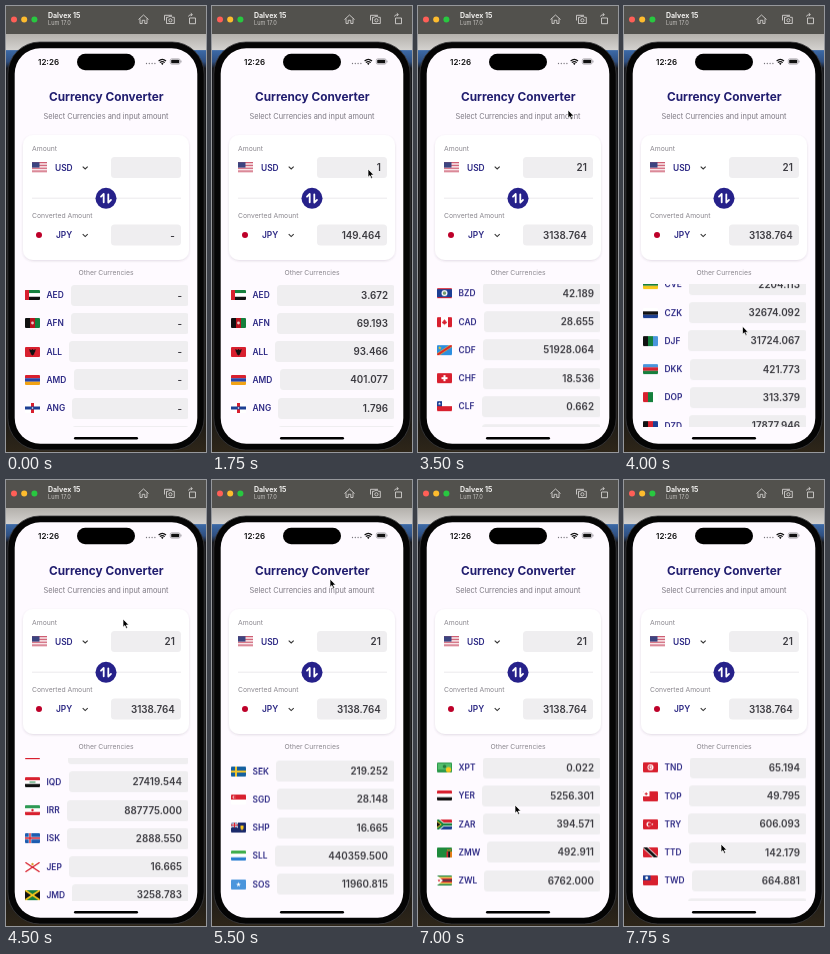
Write an HTML page that moves like this. It is 200x446 px and loops after 8 s.

```html
<!DOCTYPE html>
<html lang="en">
<head>
<meta charset="utf-8">
<title>Currency Converter</title>
<style>
html, body { margin: 0; width: 100%; height: 100%; overflow: hidden; background: #111; }
body { position: relative; font-family: Inter, sans-serif; }
#stage, #pointer { position: absolute; left: 0; top: 0; }
text { font-family: Inter, sans-serif; }
.hint { font-size: 6.8px; fill: #8b888f; }
.code { font-size: 8.4px; font-weight: 600; fill: #2c2884; color: #2c2884; }
.value { font-size: 9.8px; font-weight: 600; fill: #3c3b41; color: #3c3b41; }
#list { position: absolute; left: 18.5px; top: 277.5px; width: 163.5px; height: 143.5px; overflow: hidden; }
#rows { margin-top: -2.5px; will-change: transform; }
.row { display: flex; align-items: center; height: 28.25px; }
.row svg { flex: none; border-radius: 1px; margin-right: 6.5px; }
.row .value { flex: 1; margin-left: 7.2px; padding-right: 6.5px; line-height: 21px; height: 21px;
  text-align: right; background: #efeef0; border-radius: 3.5px; }
</style>
</head>
<body>
<svg id="stage" width="200" height="446" viewBox="0 0 200 446">
  <defs>
    <linearGradient id="desk" x2="0" y2="1">
      <stop offset=".062" stop-color="#b3b0ab"/><stop offset=".098" stop-color="#d3d1ce"/>
      <stop offset=".1" stop-color="#3b69a6"/><stop offset=".125" stop-color="#2f4f80"/>
      <stop offset=".14" stop-color="#17181c"/><stop offset=".92" stop-color="#1c1a17"/>
      <stop offset="1" stop-color="#2e2619"/>
    </linearGradient>
    <filter id="soft" x="-10%" y="-10%" width="120%" height="125%">
      <feDropShadow dx="0" dy="1" stdDeviation="1.3" flood-color="#4a3c5a" flood-opacity=".16"/>
    </filter>
  </defs>
  <rect width="200" height="446" fill="url(#desk)"/>
  <rect width="200" height="28" fill="#52514d"/>
  <circle cx="8" cy="13.5" r="3" fill="#ff5f57"/>
  <circle cx="18.2" cy="13.5" r="3" fill="#febc2e"/>
  <circle cx="28.4" cy="13.5" r="3" fill="#28c840"/>
  <text x="42" y="12.2" font-size="7" font-weight="700" fill="#f3f2f0">Dalvex 15</text>
  <text x="42" y="19.2" font-size="5.6" fill="#c4c2bf">Lum 17.0</text>
  <g fill="none" stroke="#d2d0cd" stroke-width=".9" stroke-linejoin="round">
    <path d="M132.5 13.5L137.5 9L142.5 13.5M134 12.5V17.5H136.2V14.3H138.8V17.5H141V12.5"/>
    <path d="M158.5 14.5V9.3H166M160.5 11.3H162.3L163 10.3H165.5L166.2 11.3H168.3V17.5H160.5Z"/>
    <circle cx="164.4" cy="14.3" r="1.6"/>
    <path d="M183.5 12H189.5V17.7H183.5ZM182.5 10.5Q182.7 8.6 186 8.6M184.8 7.2L186.4 8.6L184.8 10"/>
  </g>

  <rect x="1.8" y="36" width="196.4" height="408" rx="32" fill="#050505" stroke="#3c3c3e" stroke-width=".8"/>
  <rect x="8.7" y="42.3" width="182.6" height="395.4" rx="25.6" fill="#fefaff"/>
  <rect x="71" y="47.8" width="58" height="16.4" rx="8.2"/>
  <text x="32" y="58.8" font-size="8" font-weight="600" fill="#111">12:26</text>
  <path d="M140.5 57.5H149.5" stroke="#77747b" stroke-width="1.3" stroke-linecap="round" stroke-dasharray="0 2.8"/>
  <path d="M152.6 55Q156.3 51.6 160 55M153.9 56.6Q156.3 54.5 158.7 56.6" fill="none" stroke="#111" stroke-width="1.2"/>
  <path d="M155 57.6Q156.3 56.6 157.6 57.6L156.3 59Z"/>
  <rect x="164.3" y="52.8" width="9.8" height="5.4" rx="1.6" fill="none" stroke="#8a878d" stroke-width=".6"/>
  <rect x="165.2" y="53.7" width="8" height="3.6" rx=".9" fill="#111"/>
  <path d="M175 54.6V56.4" stroke="#8a878d" stroke-width=".8"/>

  <text x="100.3" y="95.2" font-size="11.8" font-weight="700" fill="#211d6f" text-anchor="middle">Currency Converter</text>
  <text x="100" y="112.8" font-size="7.4" fill="#7d7983" text-anchor="middle">Select Currencies and input amount</text>

  <rect x="17" y="129" width="166" height="125" rx="10" fill="#fff" filter="url(#soft)"/>
  <text class="hint" x="26" y="145.2">Amount</text>
  <text class="hint" x="26" y="212.4">Converted Amount</text>
  <g id="from" transform="translate(26,156.2)"></g>
  <g id="to" transform="translate(26,224)"></g>
  <text class="code" x="49" y="164.6">USD</text>
  <text class="code" x="50" y="232.2">JPY</text>
  <path d="M76.7 160.6L79.2 163L81.7 160.6M76.7 228.2L79.2 230.6L81.7 228.2" fill="none" stroke="#333" stroke-width="1.1"/>
  <g fill="#efeef0">
    <rect x="105" y="151" width="70" height="21" rx="3.5"/>
    <rect x="105" y="218.5" width="70" height="21" rx="3.5"/>
  </g>
  <text id="amount" class="value" x="168.8" y="165.1" text-anchor="end"></text>
  <text id="result" class="value" x="168.8" y="232.6" text-anchor="end"></text>
  <path d="M26 192.2H175" stroke="#e6e5e9" stroke-width=".8"/>
  <circle cx="100" cy="192.3" r="10.5" fill="#26218a"/>
  <path d="M97.7 196.3V188L95 190.7M102.3 188.3V196.6L105 193.9" fill="none" stroke="#fff" stroke-width="1.8" stroke-linecap="round" stroke-linejoin="round"/>
  <text class="hint" x="100" y="269.4" text-anchor="middle">Other Currencies</text>
  <rect x="68" y="431" width="64" height="2.4" rx="1.2"/>
</svg>
<div id="list"><div id="rows"></div></div>
<svg id="pointer" width="8" height="12" viewBox="-1 -1 8 12">
  <path d="M0 0V8.2L1.9 6.5L3.2 9.4L4.6 8.8L3.3 6H5.8Z" fill="#000" stroke="#fff" stroke-width=".7"/>
</svg>

<script>
const LOOP = 8000, PITCH = 28.25, FIRST_Y = 288.5;
const $ = id => document.getElementById(id);

const codes = (
  'AED AFN ALL AMD ANG AOA ARS AUD AWG AZN BAM BBD BDT BGN BHD BIF BMD BND BOB BRL BSD BTC BTN BWP BYN BZD ' +
  'CAD CDF CHF CLF CLP CNH CNY COP CRC CUC CUP CVE CZK DJF DKK DOP DZD EGP ERN ETB EUR FJD FKP GBP GEL GGP ' +
  'GHS GIP GMD GNF GTQ GYD HKD HNL HRK HTG HUF IDR ILS IMP INR IQD IRR ISK JEP JMD JOD JPY KES KGS KHR KMF ' +
  'KPW KRW KWD KYD KZT LAK LBP LKR LRD LSL LYD MAD MDL MGA MKD MMK MNT MOP MRU MUR MVR MWK MXN MYR MZN NAD ' +
  'NGN NIO NOK NPR NZD OMR PAB PEN PGK PHP PKR PLN PYG QAR RON RSD RUB RWF SAR SBD SCR SDG SEK SGD SHP SLL ' +
  'SOS SRD SSP STD STN SVC SYP SZL THB TJS TMT TND TOP TRY TTD TWD TZS UAH UGX USD UYU UZS VES VND VUV WST ' +
  'XAF XAG XAU XCD XDR XOF XPD XPF XPT YER ZAR ZMW ZWL').split(' ');

// Worth of 21 dollars
const worth = {
  AED: 77.112, AFN: 1453.053, ALL: 1962.786, AMD: 8422.617, ANG: 37.716,
  BZD: 42.189, CAD: 28.655, CDF: 51928.064, CHF: 18.536, CLF: 0.662,
  IQD: 27419.544, IRR: 887775, ISK: 2888.55, JEP: 16.665, JMD: 3258.783, JPY: 3138.764,
  SEK: 219.252, SGD: 28.148, SHP: 16.665, SLL: 440359.5, SOS: 11960.815,
  TND: 65.194, TOP: 49.795, TRY: 606.093, TTD: 142.179, TWD: 664.881, USD: 21,
  XPT: 0.022, YER: 5256.301, ZAR: 394.571, ZMW: 492.911, ZWL: 6762
};

let seed = 7;
const random = () => (seed = seed * 16807 % 2147483647) / 2147483647;
for (const code of codes) worth[code] ??= 21 * 10 ** (random() * 3.5);

// Flags on a 15 by 10 field
const red = '#d8202f', blue = '#1c3f94', green = '#15803d', yellow = '#f9c81c', white = '#fff', black = '#111';
const shape = (d, fill) => `<path d="${d}" fill="${fill}"/>`;
const rect = (x, y, w, h, fill) => shape(`M${x} ${y}h${w}v${h}h${-w}z`, fill);
const field = fill => rect(0, 0, 15, 10, fill);
const rows = (...c) => c.map((f, i) => rect(0, i * 10 / c.length, 15, 10 / c.length, f)).join('');
const cols = (...c) => c.map((f, i) => rect(i * 15 / c.length, 0, 15 / c.length, 10, f)).join('');
const disc = (x, y, r, fill) => `<circle cx="${x}" cy="${y}" r="${r}" fill="${fill}"/>`;
const line = (d, stroke, w) => `<path d="${d}" fill="none" stroke="${stroke}" stroke-width="${w}"/>`;
const moon = (x, y, r, fill, back) => disc(x, y, r, fill) + disc(x + r * .35, y, r * .78, back);
const star = (x, y, r, fill) => shape('M' + Array.from({length: 10}, (_, i) => {
  const a = i * Math.PI / 5, k = i % 2 ? r * .4 : r;
  return `${x + k * Math.sin(a)} ${y - k * Math.cos(a)}`;
}).join('L') + 'z', fill);
const nordic = (back, outer, inner) => field(back) + line('M5 0V10M0 5H15', outer, 2.6) + line('M5 0V10M0 5H15', inner, 1.4);
const saltire = 'M0 0L15 10M15 0L0 10';

const flags = {
  USD: rows(...Array.from({length: 13}, (_, i) => i % 2 ? white : '#c0304a')) + rect(0, 0, 7.5, 5.4, '#3c4480'),
  JPY: field(white) + disc(7, 5, 3, '#bd0029'),
  AED: rows(green, white, black) + rect(0, 0, 4, 10, red),
  AFN: cols(black, '#b8141f', green) + disc(7.5, 5, 1.4, '#e9c9c4'),
  ALL: field(red) + shape('M7.5 2l1.2 1 2-1-.6 3-1 1 .3 1-1.9 1.5-1.9-1.5.3-1-1-1-.6-3 2 1z', black),
  AMD: rows(red, '#2545a8', '#f2a315'),
  ANG: field(white) + rect(6, 0, 3, 10, red) + rect(0, 3.5, 15, 3, blue) + disc(7.5, 5, .8, white),
  BZD: rows(red, ...Array(8).fill(blue), red) + disc(7.5, 5, 3, white) + disc(7.5, 5, 1.8, '#6f9a6b'),
  CAD: field(white) + rect(0, 0, 4, 10, red) + rect(11, 0, 4, 10, red) +
    shape('M7.5 2l.8 1.4.7-.2-.2 1.6 1.4-.4-.3 1.4-1.8 1.2h-1.2L5.1 5.8l-.3-1.4 1.4.4L6 3.2l.7.2zM7.3 6.5h.4V8h-.4z', red),
  CDF: field('#2c8fe0') + line('M0 10L15 0', yellow, 3) + line('M0 10L15 0', red, 2) + star(2.8, 2.8, 2, yellow),
  CHF: field(red) + line('M7.5 2V8M4.5 5H10.5', white, 2),
  CLF: rows(white, red) + rect(0, 0, 5, 5, blue) + star(2.5, 2.5, 1.6, white),
  IQD: rows(red, white, black) + line('M4.5 5H10.5', green, 1.2),
  IRR: rows('#2f9a55', white, red) + disc(7.5, 5, 1.2, red),
  ISK: nordic('#1c5cb0', white, red),
  JEP: field(white) + line(saltire, red, 1.3) + disc(7.5, 2, 1.2, '#d99b2a'),
  JMD: field(green) + shape('M0 0L7 5L0 10zM15 0L8 5L15 10z', black) + line(saltire, yellow, 1.8),
  SEK: field('#15609f') + line('M5 0V10M0 5H15', '#f0c52c', 2),
  SGD: rows(red, white) + moon(3.2, 2.5, 1.6, white, red),
  SHP: field('#1b2a6b') + line('M0 0L7 5M7 0L0 5', white, 1) + line('M3.5 0V5M0 2.5H7', white, 1.8) +
    line('M3.5 0V5M0 2.5H7', red, 1) + shape('M9.5 3h3v3l-1.5 1.8L9.5 6z', yellow),
  SLL: rows('#3fae4c', white, '#2b7fd0'),
  SOS: field('#4a95dc') + star(7.5, 5, 2.6, white),
  TND: field(red) + disc(7.5, 5, 3, white) + moon(7.3, 5, 1.9, red, white) + star(8.3, 5, 1, red),
  TOP: field(red) + rect(0, 0, 6.5, 5, white) + line('M3.2 1V4M1.7 2.5H4.7', red, 1),
  TRY: field(red) + moon(5.8, 5, 2.4, white, red) + star(9.3, 5, 1.2, white),
  TTD: field(red) + line('M1 -1L14 11', white, 4.2) + line('M1 -1L14 11', black, 2.8),
  TWD: field(red) + rect(0, 0, 7.5, 5, blue) + disc(3.7, 2.5, 1.4, white),
  XPT: field('#2f9a4d') + rect(1, 1, 13, 6, '#53bd6c') + disc(7.5, 4, 1.8, '#257a3e') + disc(11.5, 7.2, 2.6, yellow),
  YER: rows(red, white, black),
  ZAR: rows(red, blue) + line('M0 0L6 5L0 10M6 5H15', white, 4) + line('M0 0L6 5L0 10M6 5H15', green, 2.4) +
    shape('M0 1.4L4.8 5L0 8.6z', yellow) + shape('M0 2.4L3.5 5L0 7.6z', black),
  ZMW: field('#1f8a3c') + rect(9.5, 4, 1.8, 6, red) + rect(11.3, 4, 1.8, 6, black) +
    rect(13.1, 4, 1.9, 6, '#ee7d18') + line('M10 2.5L12 3L14.4 2', '#ee7d18', 1),
  ZWL: rows(green, yellow, red, black, red, yellow, green) + shape('M0 0L6 5L0 10z', white) + star(2, 5, 1.6, red)
};
const palette = [red, blue, green, yellow, white, '#4a95dc', black];
const plainFlag = () => {
  const start = Math.floor(random() * 7), step = 1 + Math.floor(random() * 5);
  const bands = [0, 1, 2].map(i => palette[(start + i * step) % 7]);
  return (random() < .6 ? rows : cols)(...bands);
};

$('from').innerHTML = flags.USD;
$('to').innerHTML = flags.JPY;
$('rows').innerHTML = codes.map(code =>
  `<div class="row"><svg width="15" height="10" viewBox="0 0 15 10">${flags[code] || plainFlag()}</svg>` +
  `<span class="code">${code}</span><span class="value"></span></div>`).join('');
const cells = [...document.querySelectorAll('.row .value')];

let shown = -1;
function showAmount(amount) {
  if (amount === shown) return;
  shown = amount;
  const convert = code => amount
    ? (Math.floor(worth[code] / 21 * amount * 1000 + 1e-3) / 1000).toFixed(3) : '-';
  $('amount').textContent = amount || '';
  $('result').textContent = convert('JPY');
  cells.forEach((cell, i) => cell.textContent = convert(codes[i]));
}

const clamp = p => Math.min(1, Math.max(0, p));
const easeOut = p => 1 - (1 - p) ** 3;
const smooth = p => p * p * (3 - 2 * p);

// Flicks: start, end, and a moment at which a row passes a height
let reached = 0;
const flicks = [
  [2650, 3750, 3500, 'BZD', 287],
  [3900, 4900, 4500, 'IQD', 302],
  [4980, 6000, 5500, 'SEK', 291.8],
  [6050, 6950, 6950, 'XPT', 287],
  [7050, 7950, 7750, 'TND', 287]
].map(([start, end, moment, code, y]) => {
  const position = codes.indexOf(code) * PITCH + FIRST_Y - y;
  const distance = (position - reached) / easeOut((moment - start) / (end - start));
  reached += distance;
  return {start, end, distance};
});
const scrollAt = t => flicks.reduce((sum, f) =>
  sum + f.distance * easeOut(clamp((t - f.start) / (f.end - f.start))), 0);

// Pointer stops: time, x, y
const stops = [
  [250, 199, 300], [800, 160, 163], [1600, 156, 163], [2050, 156, 163], [2500, 151, 388],
  [2650, 151, 388], [2950, 150, 104], [3550, 150, 104], [3800, 120, 385], [3900, 119, 385],
  [4200, 117, 139], [4600, 117, 139], [4900, 119, 385], [4980, 119, 385], [5250, 118, 99],
  [5600, 118, 99], [5950, 105, 385], [6050, 104, 385], [6350, 100, 120], [6450, 100, 120],
  [6850, 97, 325], [7050, 97, 325], [7250, 97, 364], [LOOP, 97, 364]
];
function pointerAt(t) {
  const i = stops.findIndex(s => s[0] > t);
  if (i < 1) return null;
  const [a, b] = [stops[i - 1], stops[i]], p = smooth((t - a[0]) / (b[0] - a[0]));
  return [a[1] + (b[1] - a[1]) * p, a[2] + (b[2] - a[2]) * p];
}

function draw() {
  const t = performance.now() % LOOP;
  showAmount(t < 1000 ? 0 : t < 2250 ? 1 : 21);
  $('rows').style.transform = `translateY(${-scrollAt(t)}px)`;
  const tip = pointerAt(t);
  $('pointer').style.visibility = tip ? 'visible' : 'hidden';
  if (tip) $('pointer').style.transform = `translate(${tip[0] - 1}px, ${tip[1] - 1}px)`;
  requestAnimationFrame(draw);
}
draw();
</script>
</body>
</html>
```
